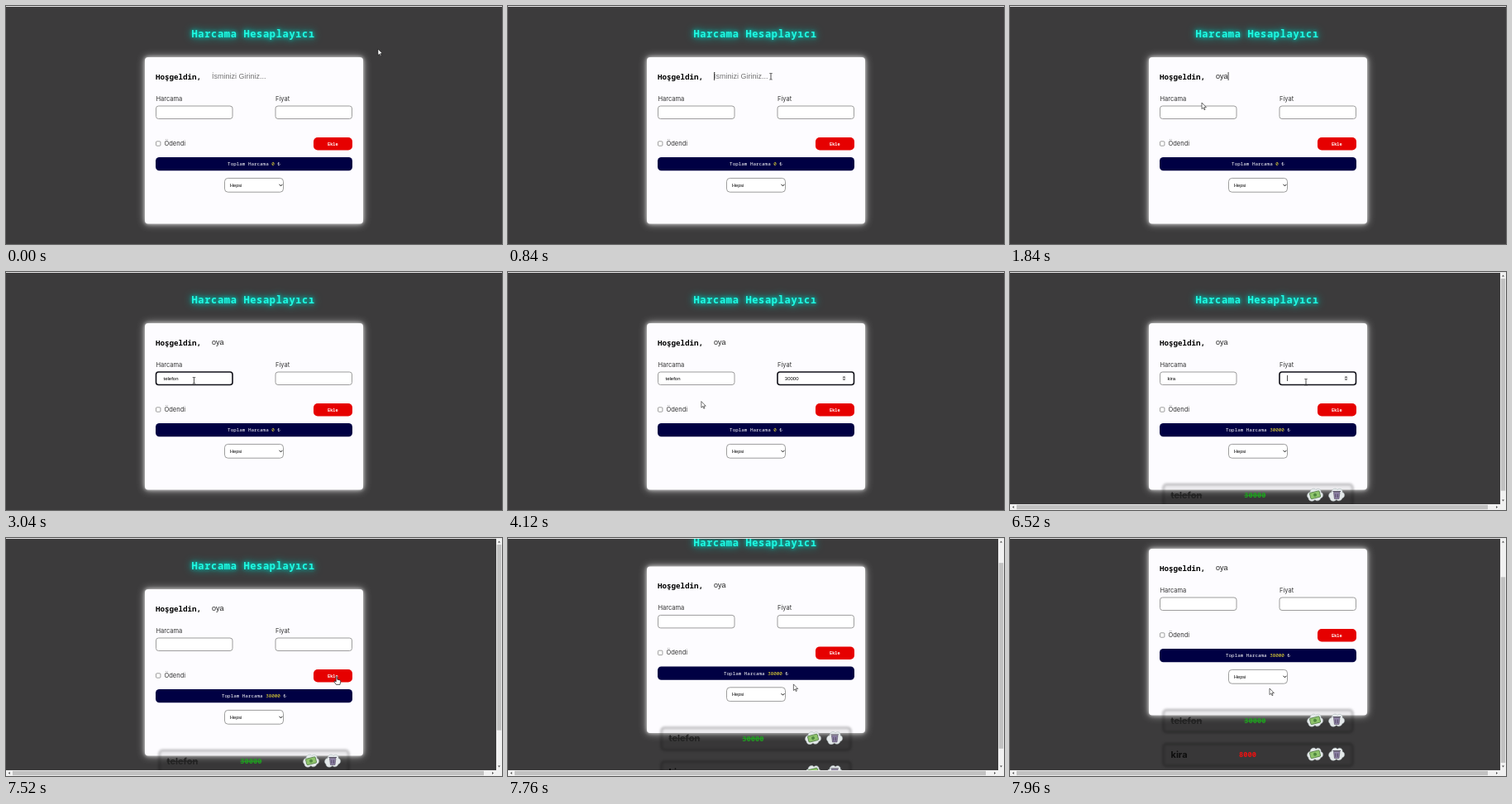
An HTML page for the animation above (8000 ms loop, 600 by 288 pixels).

```html
<!DOCTYPE html>
<html lang="tr">
<head>
<meta charset="utf-8">
<title>Harcama Hesaplayıcı</title>
<style>
  html, body { margin: 0; width: 100%; height: 100%; overflow: hidden; background: #3c3b3c; }
  svg { display: block; width: 600px; height: 288px; }
  text { white-space: pre; }
  .mono { font-family: "Noto Sans Mono", monospace; }
  .label { font: 7.5px Inter, sans-serif; fill: #333; }
  .field { font: 6px "Liberation Sans", Arial, sans-serif; }
  .name { font: 9px "Liberation Sans", Arial, sans-serif; fill: #222; }
  .box { fill: #fff; stroke: #858585; stroke-width: .8; }
  .box.focus { stroke: #101018; stroke-width: 1.6; }
  .item { font: 700 11px Inter, sans-serif; fill: #0d0d0d; }
  .price { font: 700 8.7px "Noto Sans Mono", monospace; }
  .paid { text-decoration: line-through; }
  #title { font-weight: 700; font-size: 12px; letter-spacing: .66px; fill: #1ffbe4;
    filter: drop-shadow(0 0 2px #00c8b8) drop-shadow(0 0 5px #00a89c); }
  #card { fill: #fdfcff; filter: drop-shadow(0 0 2px #fffa) drop-shadow(0 0 5px #fff9); }
  .edge { fill: #0001; stroke: #000; stroke-opacity: .3; stroke-width: 2; filter: blur(1.4px); }
</style>
</head>
<body>
<svg viewBox="0 0 600 288">
  <defs>
    <path id="cloud" d="M-8 4C-11 2-9-3-6-3C-6-7-1-9 1-6C4-9 8-6 7-3C11-2 10 4 7 4C6 8 1 8 0 6C-3 9-8 8-8 4Z" fill="#e4e9ea" stroke="#aab4b6" stroke-width=".5"/>
    <g id="cash">
      <use href="#cloud"/>
      <g transform="rotate(-14)">
        <rect x="-6" y="-3.5" width="12" height="7.5" rx="1" fill="#8fc46c" stroke="#47713a" stroke-width=".7"/>
        <circle r="2" cy=".2" fill="#4f8840"/>
      </g>
    </g>
    <g id="bin">
      <use href="#cloud"/>
      <path d="M-3.5-3H4L3 5H-2.5Z" fill="#8f82a8" stroke="#4d465c" stroke-width=".6"/>
      <path d="M-4.5-4H5M-1-1V3.5M1.5-1V3.5" stroke="#4d465c" stroke-width=".9"/>
    </g>
  </defs>

  <g id="page">
    <text id="title" class="mono" x="224.5" y="38">Harcama Hesaplayıcı</text>
    <rect id="card" x="168" y="62" width="264" height="201.5" rx="4"/>
    <text class="mono" x="181" y="89" font-size="9.2" font-weight="700">Hoşgeldin,</text>
    <text id="hint" class="name" x="249" y="88" style="fill:#757575">İsminizi Giriniz...</text>
    <text id="user" class="name" x="249" y="88"></text>
    <text class="label" x="181.5" y="114.5">Harcama</text>
    <text class="label" x="326" y="114.5">Fiyat</text>
    <rect id="costBox" class="box" x="181.5" y="121" width="92.5" height="15.5" rx="3"/>
    <rect id="priceBox" class="box" x="326" y="121" width="92.5" height="15.5" rx="3"/>
    <text id="cost" class="field" x="190.5" y="130.8"></text>
    <text id="price" class="field" x="334.8" y="130.8"></text>
    <g id="spin">
      <rect x="404" y="125.5" width="5" height="6" fill="#eee"/>
      <path d="M404.8 128L406.5 126L408.2 128ZM404.8 129.2L406.5 131.2L408.2 129.2Z" fill="#555"/>
    </g>
    <rect id="caret" y="125" width=".7" height="7"/>
    <rect x="181.5" y="163.8" width="5.4" height="5.4" rx="1" fill="#fff" stroke="#767676" stroke-width=".7"/>
    <g id="check">
      <rect x="181.2" y="163.5" width="6" height="6" rx="1" fill="#0075ff"/>
      <path d="M182.5 166.5L183.8 167.9L186 165" fill="none" stroke="#fff" stroke-width=".9"/>
    </g>
    <text class="label" x="191.5" y="169">Ödendi</text>
    <rect x="372" y="159" width="47" height="15.5" rx="5" fill="#e60000"/>
    <text class="mono" x="395.3" y="168.6" font-size="5.2" font-weight="600" fill="#fff" text-anchor="middle">Ekle</text>
    <rect x="181" y="183" width="238" height="16.3" rx="4.5" fill="#000043"/>
    <text class="mono" x="300" y="193.3" font-size="5.92" fill="#fff" text-anchor="middle">Toplam Harcama <tspan id="total" fill="#ffee32">0</tspan> ₺</text>
    <rect class="box" x="264.5" y="208.4" width="71" height="16.8" rx="4"/>
    <text class="field" x="271" y="218.8" style="font-size:5.6px">Hepsi</text>
    <path d="M330.6 215.8L332.5 217.8L334.4 215.8" fill="none" stroke="#111" stroke-width="1"/>

    <g id="item1">
      <rect class="edge" x="185.5" y="257" width="229" height="27" rx="4"/>
      <text class="item paid" x="194.5" y="274" style="fill:#222">telefon</text>
      <text class="price paid" x="283.3" y="273.3" fill="#1fa01f">30000</text>
      <use href="#cash" x="369" y="269.5"/>
      <use id="bin1" href="#bin" x="395" y="269.5"/>
    </g>
    <g id="item2">
      <rect class="edge" x="185.5" y="298" width="229" height="27" rx="4"/>
      <text class="item" x="194.5" y="315">kira</text>
      <text class="price" x="277" y="314.3" fill="#f01010">8000</text>
      <use href="#cash" x="369" y="310.5"/>
      <use href="#bin" x="395" y="310.5"/>
    </g>
  </g>

  <rect width="600" height="1" fill="#e4e4e4"/>
  <g id="bars">
    <path d="M593 1H600V288H0V281H593Z" fill="#f1f1f1"/>
    <rect id="thumb" x="593.8" width="5.4" fill="#c1c1c1"/>
    <rect x="8" y="281.8" width="570" height="5.4" fill="#c1c1c1"/>
    <path d="M595 5.6L596.5 3.6L598 5.6ZM595 275.6L596.5 277.6L598 275.6ZM4.8 283L2.8 284.5L4.8 286ZM588 283L590 284.5L588 286Z" fill="#505050"/>
  </g>

  <g id="pointer" stroke-linejoin="round">
    <path id="arrow" d="M0 0V7.6L1.8 6L3 8.7L4.1 8.2L2.9 5.6H5.4Z" fill="#fff" stroke="#111" stroke-width=".6"/>
    <path id="beam" d="M-1.6-3.5H-.4L0-3.1L.4-3.5H1.6M0-3.1V3.6M-1.6 4H-.4L0 3.6L.4 4H1.6" fill="none" stroke="#222" stroke-width=".8"/>
    <path id="hand" d="M-.8 0Q0-1 .8 0V3.2L4 4Q5 4.4 4.8 5.6L4 9.4H-.6L-3 6Q-3.2 4.7-2 5L-.8 6Z" fill="#fff" stroke="#111" stroke-width=".7"/>
  </g>
</svg>
<script>
const $ = id => document.getElementById(id);
const show = (id, on) => $(id).style.display = on ? '' : 'none';
const clamp = v => Math.max(0, Math.min(1, v));
const ease = v => v * v * (3 - 2 * v);
const ADD1 = 4600, ADD2 = 7480;

// pointer stops: time, x, y
const stops = [
  [40, 450, 52], [800, 318, 85], [1700, 318, 85], [1840, 232, 117], [2000, 226, 131],
  [3020, 226, 131], [3360, 358, 133], [3940, 358, 133], [4220, 184, 166], [4270, 184, 166],
  [4560, 398, 171], [4780, 398, 171], [5080, 226, 131], [6220, 226, 131], [6480, 358, 133],
  [7200, 358, 133], [7440, 400, 168], [7560, 400, 168], [7900, 314, 182]
];

// focus from "on" to "off", one key at each time in "keys"
const runs = [
  { id: 'user', text: 'oya', on: 800, off: 2000, clear: 8000, keys: [1040, 1240, 1440] },
  { id: 'cost', text: 'telefon', on: 2000, off: 3400, clear: ADD1, keys: [2240, 2440, 2520, 2600, 2680, 2760, 2840] },
  { id: 'price', text: '30000', on: 3400, off: 4240, clear: ADD1, keys: [3440, 3520, 3600, 3680, 3760] },
  { id: 'cost', text: 'kira', on: 5080, off: 6480, clear: ADD2, keys: [5640, 5840, 5960, 6080] },
  { id: 'price', text: '8000', on: 6480, off: 7440, clear: ADD2, keys: [6720, 6800, 6920, 7000] }
];

function pointerAt(t) {
  const i = stops.findIndex(s => s[0] > t);
  if (i === 0) return stops[0].slice(1);
  if (i < 0) return stops.at(-1).slice(1);
  const [a, b] = [stops[i - 1], stops[i]];
  const k = ease((t - a[0]) / (b[0] - a[0]));
  return [a[1] + (b[1] - a[1]) * k, a[2] + (b[2] - a[2]) * k];
}

function drawFields(t) {
  const value = { user: '', cost: '', price: '' };
  let focus = null, last = 0;
  for (const r of runs) {
    if (t < r.on || t >= r.clear) continue;
    const done = r.keys.filter(k => k <= t);
    value[r.id] = r.text.slice(0, done.length);
    if (t < r.off) {
      focus = r.id;
      last = done.at(-1) ?? r.on;
    }
  }
  for (const id in value) $(id).textContent = value[id];
  show('hint', !value.user);
  $('costBox').classList.toggle('focus', focus === 'cost');
  $('priceBox').classList.toggle('focus', focus === 'price');
  show('caret', focus && (t - last) % 400 < 200);
  if (focus) {
    const el = $(focus), name = focus === 'user';
    const width = value[focus] ? el.getComputedTextLength() : 0;
    $('caret').setAttribute('x', +el.getAttribute('x') + width + .2);
    $('caret').setAttribute('y', name ? 80 : 125);
    $('caret').setAttribute('height', name ? 10 : 7);
  }
  return focus;
}

function drawPointer(t) {
  const [x, y] = pointerAt(t);
  const over = (l, top, r, b) => x > l && x < r && y > top && y < b;
  const priceHover = over(326, 121, 419, 137);
  const beam = over(243, 78, 340, 92) || over(181, 121, 274, 137) || priceHover;
  const hand = over(372, 159, 419, 175);
  show('beam', beam);
  show('hand', hand);
  show('arrow', !beam && !hand);
  $('pointer').setAttribute('transform', `translate(${x} ${y})`);
  return priceHover;
}

function draw(t) {
  const focus = drawFields(t);
  const hover = drawPointer(t);
  show('spin', focus === 'price' || hover);
  show('check', t >= 4240 && t < ADD1);
  $('total').textContent = t < ADD1 ? '0' : t < ADD2 ? '30000' : '38000';

  $('item1').style.opacity = clamp((t - ADD1) / 140);
  show('bin1', t >= 4800);
  show('item2', t >= ADD2);
  show('bars', t >= ADD1);

  const scroll = 49 * ease(clamp((t - 7620) / 260));
  const extent = t < ADD2 ? 288 : 329;
  $('page').setAttribute('transform', `translate(0 ${-scroll})`);
  $('thumb').setAttribute('y', 8 + scroll / extent * 264);
  $('thumb').setAttribute('height', 280 / extent * 264);
}

function tick() {
  draw(performance.now() % 8000);
  requestAnimationFrame(tick);
}
tick();
</script>
</body>
</html>
```
